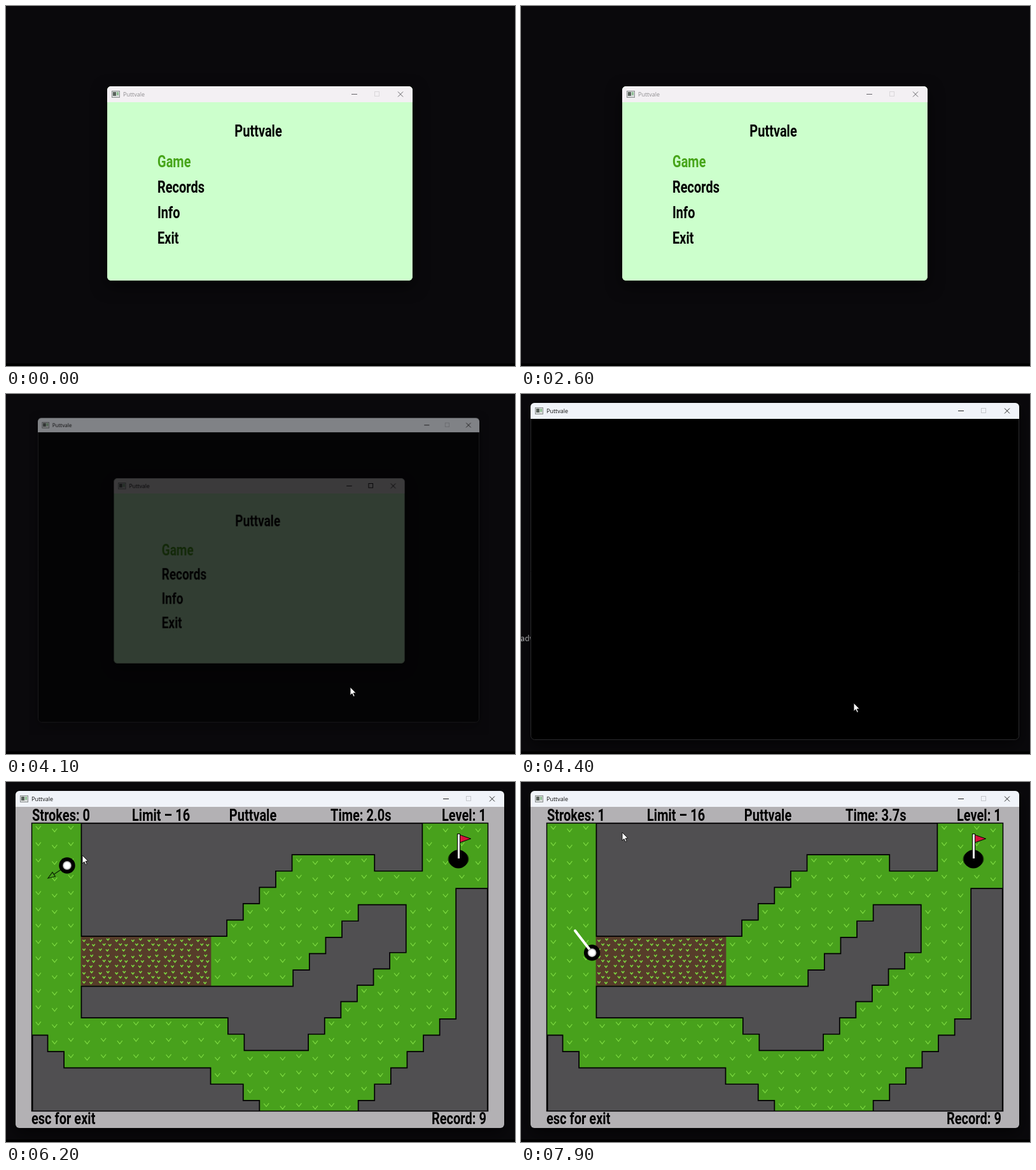
Animation of 800x565 px, one loop 8 s. Source, as an HTML page with a canvas:

```html
<!DOCTYPE html>
<html lang="en">
<head>
<meta charset="utf-8">
<title>Puttvale</title>
<style>
html, body { margin: 0; width: 100%; height: 100%; overflow: hidden; background: #0a090c; }
canvas { display: block; width: 800px; height: 565px; }
</style>
</head>
<body>
<canvas id="stage" width="800" height="565"></canvas>
<script>
const W = 800, H = 565, LOOP = 8000, STEP = 100;
const NAME = 'Puttvale';
const CELL = 25.6, X0 = 40.8, Y0 = 63.8;
const FIELD = [40.5, 64.5, 717, 452];
const MENU = { x: 159, y: 126, w: 480, h: 305, bar: 25 };
const GAME = { x: 15, y: 14, w: 768, h: 529, bar: 25 };
const OPEN = 4000, LEVEL = 4500, CLOCK = 4200, GRAB = 6100, SHOT = 7360;
const BALL = { x: 96, y: 131 };

const stage = document.getElementById('stage').getContext('2d');

function layer(draw) {
  const c = document.createElement('canvas');
  c.width = W;
  c.height = H;
  draw(c.getContext('2d'));
  return c;
}

function poly(g, pts, close) {
  g.beginPath();
  pts.forEach(([x, y]) => g.lineTo(x, y));
  if (close) g.closePath();
}

function disc(g, x, y, rx, ry, fill) {
  g.fillStyle = fill;
  g.beginPath();
  g.ellipse(x, y, rx, ry, 0, 0, Math.PI * 2);
  g.fill();
}

// Condensed display face used by the menu and the score lines.
function label(g, text, x, y, color = '#000', align = 'left') {
  g.save();
  g.translate(x, y);
  g.scale(0.77, 1);
  g.font = '600 26px Roboto, sans-serif';
  g.textAlign = align;
  g.fillStyle = color;
  g.fillText(text, 0, 0);
  g.restore();
}

function frame(g, win, look) {
  const { x, y, w, h, bar } = win;
  const r = x + w, mid = y + bar / 2;
  g.save();
  g.shadowColor = 'rgba(0,0,0,0.6)';
  g.shadowBlur = 24;
  g.shadowOffsetY = 8;
  g.fillStyle = look.body;
  g.beginPath();
  g.roundRect(x, y, w, h, 6);
  g.fill();
  g.restore();

  g.lineWidth = 1;
  g.strokeStyle = look.edge;
  g.beginPath();
  g.roundRect(x + 0.5, y + 0.5, w - 1, h - 1, 6);
  g.stroke();
  g.fillStyle = look.bar;
  g.beginPath();
  g.roundRect(x, y, w, bar, [6, 6, 0, 0]);
  g.fill();

  g.fillStyle = '#d9dcdc';
  g.fillRect(x + 7, y + 7, 12, 10);
  g.strokeStyle = '#8b8f90';
  g.strokeRect(x + 7.5, y + 7.5, 12, 10);
  g.fillStyle = '#59625c';
  g.fillRect(x + 9, y + 9, 5, 6);
  g.fillStyle = '#8fbf94';
  g.fillRect(x + 15, y + 9, 3, 5);

  g.font = '9px "Open Sans", sans-serif';
  g.fillStyle = look.text;
  g.fillText(NAME, x + 25, y + 16);

  g.strokeStyle = look.icon;
  g.beginPath();
  g.moveTo(r - 96, mid);
  g.lineTo(r - 87, mid);
  g.moveTo(r - 23, mid - 4);
  g.lineTo(r - 15, mid + 4);
  g.moveTo(r - 15, mid - 4);
  g.lineTo(r - 23, mid + 4);
  g.stroke();
  g.strokeStyle = look.max;
  g.strokeRect(r - 59.5, mid - 4, 7, 7);
}

const menuLayer = look => layer(g => {
  frame(g, MENU, { body: '#ccffcc', bar: '#f3f0f3', edge: '#c3e6bf', ...look });
  label(g, NAME, 396.5, 205, '#000', 'center');
  ['Game', 'Records', 'Info', 'Exit'].forEach((item, i) =>
    label(g, item, 238, 252.5 + 40 * i, i ? '#000' : '#47a51a'));
});

const idleMenu = menuLayer({ text: '#8f8d90', icon: '#66656a', max: '#d9d6d9' });
const liveMenu = menuLayer({ text: '#111', icon: '#222', max: '#cfcccf' });
const closingMenu = menuLayer({ text: '#111', icon: '#111', max: '#111' });
const emptyGame = layer(g => frame(g, GAME, {
  body: '#000', bar: '#f0f3f9', edge: '#2b2b2d', text: '#111', icon: '#222', max: '#c6c8cd'
}));

// Walls: a start cell, then alternating horizontal and vertical runs.
const WALLS = [
  [3, 0, 21, 3, -3, -1, -5, 1, -1, 1, -1, 1, -1, 1, -1, 1, -9],
  [3, 10, 13, -1, 1, -1, 1, -1, 1, -1, 1, -1, 3, 3, -1, 1, -1, 1, -1, 1, -1, 1,
    -1, 1, -1, 1, -4, -1, -1, -1, -9],
  [0, 13, 1, 1, 1, 1, 9, 1, 2, 1, 1, 2, -14],
  [28, 4, -2, 8, -1, 1, -1, 1, -1, 1, -1, 1, -1, 1, -1, 2, 8]
];

function wallPoints([cx, cy, ...runs]) {
  const at = () => [X0 + cx * CELL, Y0 + cy * CELL];
  const pts = [at()];
  runs.forEach((n, i) => {
    if (i % 2) cy += n; else cx += n;
    pts.push(at());
  });
  return pts;
}

function tuft(g, x, y, s) {
  g.moveTo(x - s, y - s * 0.6);
  g.lineTo(x, y + s * 0.6);
  g.lineTo(x + s, y - s * 0.7);
}

const level = layer(g => {
  g.fillStyle = '#b3b1b4';
  g.beginPath();
  g.roundRect(GAME.x, GAME.y + GAME.bar, GAME.w, GAME.h - GAME.bar, [0, 0, 6, 6]);
  g.fill();

  g.save();
  g.beginPath();
  g.rect(...FIELD);
  g.clip();
  g.fillStyle = '#48a11c';
  g.fillRect(...FIELD);
  g.strokeStyle = '#7bd83f';
  g.lineWidth = 1.2;
  g.beginPath();
  for (let c = 0; c < 28; c++)
    for (let r = 0; r < 18; r++)
      tuft(g, X0 + c * CELL + 10, Y0 + r * CELL + (c % 2 ? 12 : 8), 4);
  g.stroke();

  g.fillStyle = '#573c2a';
  g.fillRect(X0 + 3 * CELL, Y0 + 7 * CELL, 8 * CELL, 3 * CELL);
  g.lineWidth = 1.6;
  g.beginPath();
  for (let c = 3; c < 11; c++)
    for (let r = 7; r < 10; r++)
      [[5, 6], [17, 4], [11, 12], [20, 13], [5, 20], [16, 21]].forEach(([dx, dy]) =>
        tuft(g, X0 + c * CELL + dx, Y0 + r * CELL + dy, 2.2));
  g.stroke();

  // Outlines lie inside the walls, so half of each stroke is clipped away.
  g.fillStyle = '#504f51';
  g.strokeStyle = '#000';
  g.lineWidth = 3.4;
  for (const wall of WALLS) {
    g.save();
    poly(g, wallPoints(wall), true);
    g.clip();
    g.fill();
    g.stroke();
    g.restore();
  }
  g.restore();
  g.strokeStyle = '#000';
  g.lineWidth = 1.5;
  g.strokeRect(...FIELD);

  disc(g, 711, 121, 16.5, 13, 'rgba(0,0,0,0.6)');
  disc(g, 711, 121, 15, 14.5, '#000');
  g.fillRect(709, 81, 5, 41);
  g.fillStyle = '#fff';
  g.fillRect(710, 82, 3, 38);
  g.fillStyle = '#d3143c';
  g.lineWidth = 1;
  poly(g, [[713.5, 83], [730.5, 89], [713.5, 95]], true);
  g.fill();
  g.stroke();

  label(g, 'Limit – 16', 198, 61);
  label(g, NAME, 388, 61, '#000', 'center');
  label(g, 'Level: 1', 685, 61);
  label(g, 'esc for exit', 40, 537);
  label(g, 'Record: 9', 669, 537);
});

// Pointer keys: time, x, y.
const POINTER = [
  [2000, 389, 531], [2100, 389, 531], [2500, 450, 397],
  [4000, 547, 452], [4100, 541, 460], [4400, 523, 485], [5000, 492, 522],
  [5300, 487, 540], [5500, 440, 482], [5800, 200, 255], [6000, 99, 131],
  [6200, 120, 115], [6700, 127, 93], [7000, 128, 89], [7400, 128, 89], [7900, 159, 79]
];

function pointerAt(t) {
  let i = 1;
  while (i < POINTER.length - 1 && POINTER[i][0] < t) i++;
  const [ta, xa, ya] = POINTER[i - 1], [tb, xb, yb] = POINTER[i];
  const u = Math.min(1, (t - ta) / (tb - ta));
  return [xa + (xb - xa) * u, ya + (yb - ya) * u];
}

function drawPointer(g, [x, y]) {
  const shape = [[0, 0], [0, 13], [3, 10.2], [5.2, 15], [7.2, 14], [5.1, 9.4], [9, 9.2]];
  poly(g, shape.map(([dx, dy]) => [x + dx, y + dy]), true);
  g.fillStyle = '#fff';
  g.strokeStyle = '#111';
  g.lineWidth = 1;
  g.fill();
  g.stroke();
}

function ballAt(t) {
  const s = Math.max(0, t - SHOT) / 1000;
  const d = 400 * s - 148 * s * s;
  return [51 + Math.abs(BALL.x - 51 - d * 0.611), BALL.y + d * 0.792];
}

function drawBall(g, t) {
  const [x, y] = ballAt(t);
  disc(g, x, y, 12.7, 12.7, '#000');
  if (t > SHOT) {
    const trail = [];
    for (let k = 165; k >= 0; k -= 5) trail.push(ballAt(t - k));
    poly(g, trail);
    g.strokeStyle = '#fff';
    g.lineWidth = 4;
    g.lineCap = g.lineJoin = 'round';
    g.stroke();
    g.lineCap = 'butt';
    g.lineJoin = 'miter';
  }
  disc(g, x, y, 7, 7, '#8d8d8d');
  disc(g, x, y, 6, 6, '#e4e4e4');
  disc(g, x, y, 4.5, 4.5, '#fff');
}

function drawAim(g, [px, py]) {
  const dx = (BALL.x - px) * 1.25, dy = (BALL.y - py) * 1.25;
  const len = Math.hypot(dx, dy);
  if (len < 16) return;
  g.save();
  g.translate(BALL.x, BALL.y);
  g.rotate(Math.atan2(dy, dx));
  g.strokeStyle = '#0c2405';
  g.fillStyle = '#48a11c';
  g.lineWidth = 1.2;
  poly(g, [[12, 0], [len - 11, 0]]);
  g.stroke();
  poly(g, [[len, 0], [len - 11, -4], [len - 11, 4]], true);
  g.fill();
  g.stroke();
  g.restore();
}

function blit(g, image, scale, alpha) {
  const cx = 398.5, cy = 278.5;
  g.save();
  g.globalAlpha = alpha;
  g.translate(cx - (1 - scale) * 20, cy - (1 - scale) * 20);
  g.scale(scale, scale);
  g.drawImage(image, -cx, -cy);
  g.restore();
}

function render(t) {
  const g = stage;
  g.fillStyle = '#0a090c';
  g.fillRect(0, 0, W, H);
  g.fillStyle = '#000';
  g.fillRect(0, 561, W, 4);

  if (t < OPEN) {
    g.drawImage(t < 3100 ? idleMenu : liveMenu, 0, 0);
  } else {
    const u = Math.min(1, (t - OPEN) / 300);
    const p = 1 - Math.pow(1 - u, 1.8);
    if (p < 1) blit(g, p ? closingMenu : liveMenu, 1 - 0.092 * p, 1 - p);
    if (t >= 4300 && t < LEVEL) {
      g.font = '600 12px "Open Sans", sans-serif';
      g.fillStyle = '#a9a9ab';
      g.fillText('adw', -1, 388);
    }
    blit(g, emptyGame, 0.8 + 0.2 * p, p);
  }

  const pointer = pointerAt(t);
  if (t >= LEVEL) {
    g.drawImage(level, 0, 0);
    label(g, 'Strokes: ' + (t > SHOT ? 1 : 0), 41, 61);
    label(g, 'Time: ' + ((t - CLOCK) / 1000).toFixed(1) + 's', 510, 61);
    if (t >= GRAB && t < SHOT) drawAim(g, pointer);
    drawBall(g, t);
  }
  if ((t >= 2000 && t < 2600) || t >= OPEN) drawPointer(g, pointer);
}

let start;
function tick(now) {
  start ??= now;
  const t = (now - start) % LOOP;
  render(Math.floor(t / STEP) * STEP);
  requestAnimationFrame(tick);
}
render(0);
requestAnimationFrame(tick);
</script>
</body>
</html>
```
